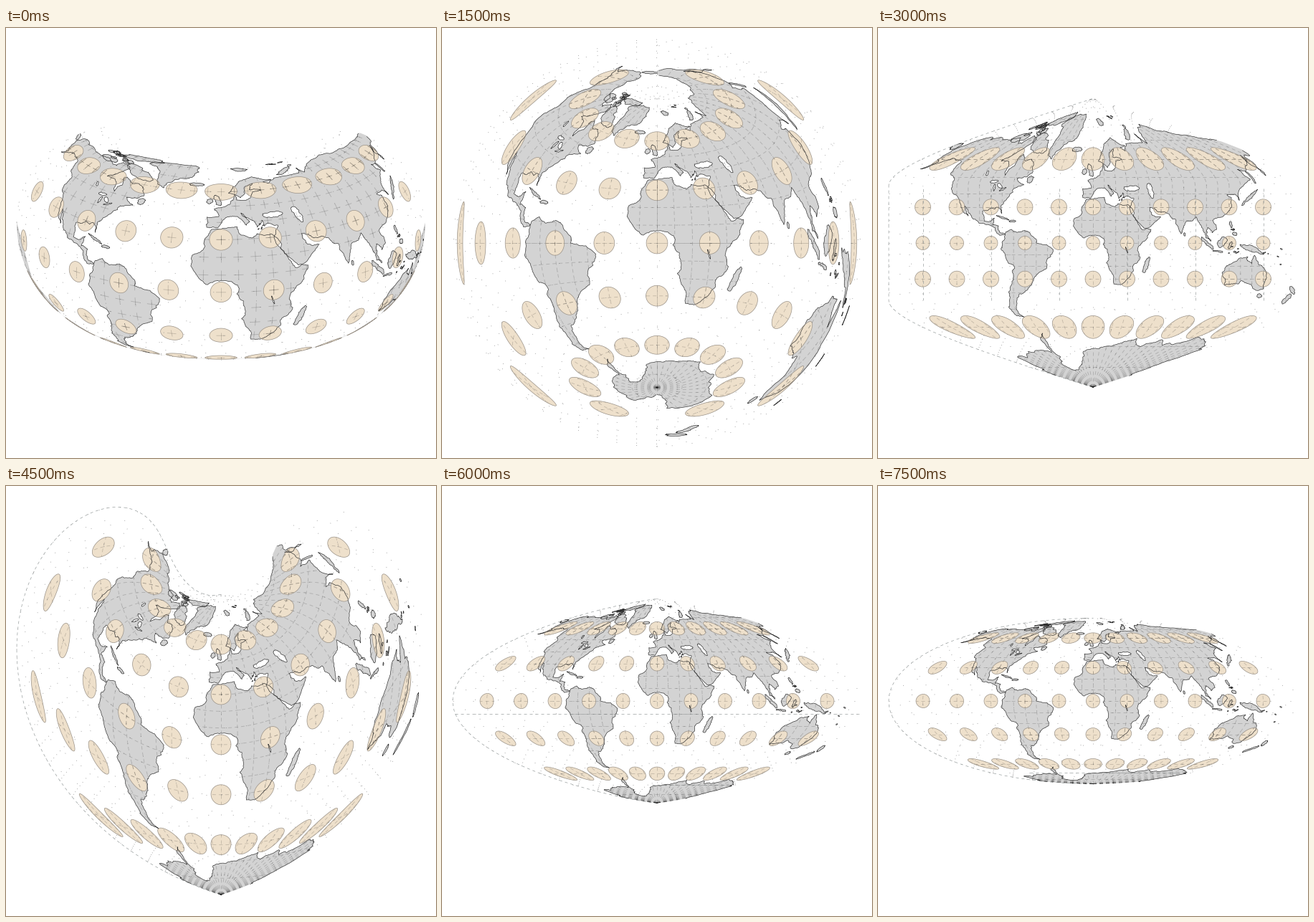
Recreate the animation shown at these times as a matplotlib script. Size 600x600 px, loop 8000 ms.

```python
import matplotlib.pyplot as plt
import numpy as np
from matplotlib.animation import FuncAnimation
from matplotlib.collections import LineCollection, PathCollection
from matplotlib.path import Path

plt.rcParams["lines.scale_dashes"] = False
SIZE, REACH, PX = 600, 285, 0.72
LAND, COAST, DISC = "#d3d3d3", "#2e2e2e", "#eee0cb"
rng = np.random.default_rng(7)

# Main capes and bays as lon, lat pairs; finer coast comes from roughen()
AFRICA = [
    -6, 35.8, 10, 37.3, 11, 33.5, 19, 30.5, 22, 32.8, 32.4, 31, 37.2, 21, 43.2, 11.5,
    51.1, 11.9, 48, 4.3, 39.5, -4.5, 40.6, -15, 34.8, -20, 35.5, -24, 32.5, -28.4,
    26, -33.9, 18.4, -34, 14.5, -23, 11.8, -17, 13.7, -11, 8.9, -1, 9.4, 4, 4.4, 6.3,
    -7.6, 4.4, -13.3, 9, -17.3, 14.7, -16.5, 21, -9.7, 30]
EURASIA = [
    32.5, 30.5, 36, 36.5, 27.5, 36.8, 26.2, 40.4, 22.8, 36.5, 19.4, 41, 13.2, 45.5,
    18.3, 40, 16, 38, 10.5, 43.5, 3.2, 43, -2, 36.8, -8.9, 37, -9.2, 43.1, -1.5, 43.5,
    -4.6, 48.2, 8.5, 53.8, 10, 57.5, 11, 54, 21, 55, 23.5, 59.2, 30, 59.9, 21.4, 61,
    25, 65.3, 17.5, 62, 14.2, 55.5, 5.5, 59, 14, 67.5, 26, 71, 41, 67, 34, 66, 38, 64.3,
    44, 68, 68, 68.5, 69, 72.8, 73, 68, 81, 73.5, 104, 77.6, 140, 72.6, 180, 69,
    180, 65, 163, 59.5, 157, 51, 156, 57, 163, 62, 137, 54.5, 140.5, 49, 128, 40,
    129, 35.2, 125, 39.5, 118, 39, 122, 37, 122, 30, 114, 22.3, 106, 20, 109, 12,
    105, 9, 101, 13.5, 104, 1.5, 98.5, 9, 94.5, 16, 91, 22.5, 80.2, 15, 77.6, 8,
    72.7, 20.5, 67, 24.8, 57, 26.5, 50, 30, 51.5, 24.5, 59.7, 22.4, 45, 12.8, 35, 28]
NORTH_AMERICA = [
    -168, 65.6, -166, 68.3, -156.5, 71.3, -128, 70, -96, 68, -94, 72, -82, 69, -87, 64.5,
    -94.5, 59, -82, 55, -80, 51.3, -77, 57, -77.7, 62.5, -69.5, 59, -64.5, 60, -56, 52.5,
    -60, 50.2, -68, 49.3, -65, 47, -61, 45.5, -70, 43, -76, 36, -81.3, 31, -80.5, 25.2,
    -83.5, 30, -90, 29.5, -97.3, 27, -96, 19, -91, 18.6, -87, 21.4, -88.5, 15.8, -83.3, 15,
    -82, 9, -77.5, 8, -85.7, 10.5, -94.5, 16, -105.5, 20.5, -113, 31, -110, 23.2, -117, 33,
    -124, 41, -123.5, 48.5, -134, 58.3, -148, 60.5, -154, 58.5, -164, 54.7, -158, 58.5,
    -165, 62]
SOUTH_AMERICA = [
    -77.5, 8, -72, 12, -62, 10.7, -51.5, 4.3, -50, 0, -35, -6, -39, -13, -41, -22,
    -48.5, -26, -54, -34.5, -57.5, -38, -65, -41, -67.4, -46, -69, -51, -65.5, -54.8,
    -72, -54, -75.5, -49, -73, -38, -70.3, -19, -76.5, -14, -81.2, -5, -80, 1, -77.5, 4]
AUSTRALIA = [
    142.5, -10.8, 146, -19, 153.2, -26, 150, -37.5, 144, -38.5, 138, -34, 131, -31.5,
    124, -33.5, 116, -34.8, 113.8, -25, 122, -18, 130, -13, 136.5, -12.2, 136, -15.5,
    140, -17.6]
GREENLAND = [
    -70, 77.5, -45, 82.5, -25, 82.5, -20, 76, -25, 70.5, -40, 65, -44, 60, -52, 64.5,
    -54, 70, -60, 76]
ANTARCTICA = [
    -180, -84.5, -155, -81, -148, -76, -100, -73, -70, -73, -67, -67, -58, -63.3,
    -62.5, -69, -62, -75, -78, -79, -60, -82, -28, -79, -17, -73, 0, -71, 33, -69,
    55, -66, 70, -70, 88, -66.6, 135, -66.2, 170, -71.5, 163, -78, 170, -83.7,
    180, -84.5, 180, -90, -180, -90]
# lon, lat, half length, half width, tilt
ISLANDS = [
    (-72, 68.5, 8, 2.6, -45), (-80, 80, 4.5, 2, 35), (-110, 71, 3.5, 2, 0),
    (-19, 65, 2.3, 1.3, 0), (-2.5, 54, 4.2, 1.2, 110), (-8, 53.3, 1.7, 1.2, 80),
    (17, 78.7, 2, 1.2, -60), (58, 73.5, 4.5, 0.9, 55), (-79.5, 21.7, 5, 0.6, -20),
    (-71, 18.9, 2.8, 0.8, 0), (-56, 48.8, 2.3, 1.7, 60), (46.8, -19.3, 6.8, 2, 70),
    (80.7, 7.5, 1.4, 0.8, 90), (101, -0.5, 7.5, 1.3, -45), (110, -7.3, 4.7, 0.6, -8),
    (114, 1, 5, 3.4, 50), (121, -2, 3.5, 1, 70), (140, -5.3, 10, 2.3, -22),
    (121.5, 16, 2.8, 1, -75), (125, 8, 2, 1.5, 0), (138, 37, 7, 1, 45),
    (142.8, 50, 4, 0.6, -85), (175.7, -38.5, 3, 1.3, -60), (170.5, -44, 4.2, 1.2, 45),
    (146.6, -42, 1.5, 1.4, 0), (-175, 66.5, 2.4, 1.2, -20)]
WATERS = [
    (34, 43.3, 5.3, 1.6, 0), (50.8, 41.8, 5.2, 1.7, -75), (-87.5, 47.6, 2.6, 0.8, 5),
    (-87, 43.8, 2, 0.6, 80), (-82, 44.8, 1.8, 1, -50), (-79.5, 42.8, 2.5, 0.4, 25),
    (-97.5, 52.3, 1.5, 0.5, -65), (29.6, -6, 2.6, 0.3, -70)]


def roughen(points, levels=4, amount=0.1):
    """Close a coast and break its edges by midpoint displacement."""
    p = np.reshape(points, (-1, 2)).astype(float)
    p = np.vstack([p, p[:1]])
    for _ in range(levels):
        a, b = p[:-1], p[1:]
        mid, d = (a + b) / 2, b - a
        c = np.maximum(np.cos(np.radians(mid[:, 1])), 0.1)
        seam = (np.abs(a[:, 0]) == 180) & (np.abs(b[:, 0]) == 180) | (mid[:, 1] < -89)
        g = np.where(seam, 0, rng.normal(0, amount, len(d)))
        mid += np.column_stack([-d[:, 1] / c, d[:, 0] * c]) * g[:, None]
        mid[:, 0] = np.clip(mid[:, 0], -180, 180)
        p = np.vstack([np.stack([a, mid], 1).reshape(-1, 2), p[-1:]])
    return p


def blob(lon, lat, length, width, tilt):
    """Rough ellipse in degrees, tilted from east."""
    a, t = np.arange(10) * np.pi / 5, np.radians(tilt)
    r = rng.uniform(0.85, 1.15, 10)
    u, v = length * r * np.cos(a), width * r * np.sin(a)
    x, y = u * np.cos(t) - v * np.sin(t), u * np.sin(t) + v * np.cos(t)
    return roughen(np.column_stack([lon + x / np.cos(np.radians(lat)), lat + y]), 3, 0.12)


def scatter(count, west, east, south, north, size):
    """Small islands strewn over a box."""
    return [blob(rng.uniform(west, east), rng.uniform(south, north), size * rng.uniform(0.4, 1),
                 size * rng.uniform(0.2, 0.5), rng.uniform(-60, 60)) for _ in range(count)]


lands = [roughen(c) for c in (AFRICA, EURASIA, NORTH_AMERICA, SOUTH_AMERICA, AUSTRALIA,
                              GREENLAND, ANTARCTICA)]
lands += [blob(*i) for i in ISLANDS]
lands += scatter(12, -122, -88, 72, 78, 2.2)
lands += scatter(6, 118, 130, -9, -3, 1.3) + scatter(4, 122, 125, 9, 12.5, 0.9)
lands += scatter(6, 150, 169, -20, -5, 1) + scatter(5, 22, 27, 35, 39, 0.5)
lands += scatter(4, 45, 62, 80, 81.5, 0.8)
lakes = [blob(*w) for w in WATERS]

# Projections
TILT = np.radians(20)
turn = np.linspace(-np.pi / 2, np.pi / 2, 6001)
turn_lat = np.arcsin(np.clip((2 * turn + np.sin(2 * turn)) / np.pi, -1, 1))


def lowest(lon):
    return -np.arctan(np.cos(lon / 2) / np.tan(TILT))


def armadillo(lon, lat):
    lat = np.maximum(lat, lowest(lon))
    r = 1 + np.cos(lat)
    y = (1 + np.sin(TILT) - np.cos(TILT)) / 2 + np.sin(lat) * np.cos(TILT)
    return r * np.sin(lon / 2), y - r * np.sin(TILT) * np.cos(lon / 2)


def azimuthal(lon, lat):
    k = np.sqrt(2 / np.maximum(1 + np.cos(lat) * np.cos(lon), 1e-9))
    return k * np.cos(lat) * np.sin(lon), k * np.sin(lat)


def dinomic(lon, lat):
    a = np.abs(lat)
    b = np.maximum(a, np.pi / 4)
    inner = np.arctanh(np.sin(np.minimum(a, np.pi / 4)))
    outer = np.sqrt(8) * (b - np.pi / 4) - np.log(np.tan(b / 2))
    low = a < np.pi / 4
    x = np.where(low, lon, lon * np.cos(b) * (np.sqrt(8) - 1 / np.sin(b)))
    return x, np.sign(lat) * np.where(low, inner, outer)


def bonne(lon, lat):
    r = 1 + np.pi / 4 - lat
    e = lon * np.cos(lat) / r
    return r * np.sin(e), 1 - r * np.cos(e)


def boggs(lon, lat):
    t = np.interp(lat, turn_lat, turn)
    c, ct = np.maximum(np.cos(lat), 1e-9), np.maximum(np.cos(t), 1e-9)
    return 2.00276 * lon / (1 / c + 1.11072 / ct), 0.49931 * (lat + np.sqrt(2) * np.sin(t))


def bromley(lon, lat):
    t = np.interp(lat, turn_lat, turn)
    return lon * np.cos(t), 4 / np.pi * np.sin(t)


def meridian(lon, low=-90, high=90):
    lat = np.linspace(low, high, 181)
    return np.column_stack([np.full_like(lat, lon), lat])


def parallel(lat, west=-180, east=180):
    lon = np.linspace(west, east, 361)
    return np.column_stack([lon, np.full_like(lon, lat)])


def circle(lon, lat, radius=6):
    """Small circle on the sphere."""
    a, r, p = np.linspace(0, 2 * np.pi, 73), np.radians(radius), np.radians(lat)
    q = np.arcsin(np.sin(p) * np.cos(r) + np.cos(p) * np.sin(r) * np.cos(a))
    d = np.arctan2(np.sin(a) * np.sin(r) * np.cos(p), np.cos(r) - np.sin(p) * np.sin(q))
    return np.column_stack([lon + np.degrees(d), np.degrees(q)])


discs = [circle(lon, lat) for lat in range(-60, 61, 30) for lon in range(-150, 151, 30)]
grid = [meridian(l) for l in range(-180, 180, 10)] + [parallel(l) for l in range(-80, 81, 10)]
ARM = 2.8
crosses = [s for lon in range(-170, 180, 10) for lat in range(-80, 81, 10)
           for s in (meridian(lon, lat - ARM, lat + ARM), parallel(lat, lon - ARM, lon + ARM))]
rim = meridian(-180)

# Each view: projection, lines that show over the sea
VIEWS = [
    (armadillo, []),
    (azimuthal, []),
    (dinomic, [rim] + [meridian(l, -45, 45) for l in range(-150, 151, 60)]),
    (bonne, [rim]),
    (boggs, [rim, parallel(-10), parallel(-70, -10, 150)]),
    (bromley, [rim, parallel(-70, -110, 150)]),
]


def fit(proj):
    lon, lat = np.meshgrid(np.linspace(-np.pi, np.pi, 721), np.linspace(-np.pi / 2, np.pi / 2, 361))
    x, y = proj(lon, lat)
    return REACH / np.abs(x).max(), (y.max() + y.min()) / 2


fits = [fit(proj) for proj, _ in VIEWS]

fig = plt.figure(figsize=(6, 6), dpi=100, facecolor="white")
ax = fig.add_axes([0, 0, 1, 1])


def draw(frame):
    n = frame // 3
    proj, sea_lines = VIEWS[n]
    scale, mid = fits[n]
    ax.clear()
    ax.set(xlim=(0, SIZE), ylim=(SIZE, 0))
    ax.axis("off")

    def place(p):
        x, y = proj(*np.radians(p).T)
        return np.column_stack([300 + scale * x, 300 - scale * (y - mid)])

    def stroke(p):
        q = place(p)
        if proj is armadillo:
            q[np.radians(p[:, 1]) < lowest(np.radians(p[:, 0]))] = np.nan
        return q

    def coast(p):
        q = stroke(p)
        q[(np.abs(p[:, 0]) > 179.9) | (p[:, 1] < -89)] = np.nan
        return q

    def lines(paths, color, width, dash="solid", **kw):
        c = LineCollection(paths, colors=color, linewidths=width * PX, linestyles=dash, **kw)
        ax.add_collection(c, autolim=False)
        return c

    def fill(paths, color):
        ax.add_collection(PathCollection([Path(p) for p in paths], facecolors=color,
                                         edgecolors="none"), autolim=False)

    def net(shapes):
        c = lines(net_paths, "black", 0.9, net_dash, alpha=0.17)
        c.set_clip_path(Path.make_compound_path(*[Path(s) for s in shapes]), ax.transData)

    full = [stroke(p) for p in grid]
    net_paths, net_dash = full, (0, (5 * PX, 4 * PX))
    if proj is armadillo:
        net_paths, net_dash = [stroke(p) for p in crosses], "solid"

    ground = [place(p) for p in lands]
    lines(full, "#8a8a8a", 0.7, (0, (1 * PX, 27 * PX)))
    lines([stroke(p) for p in sea_lines], "#999f9f", 0.7, (0, (4 * PX, 4 * PX)))
    fill(ground, LAND)
    net(ground)
    fill([place(p) for p in lakes], "white")
    lines([coast(p) for p in lands + lakes], COAST, 0.65)
    spots = [place(p) for p in discs]
    fill(spots, DISC)
    net(spots)
    lines(spots, "#9a9288", 0.7)
    return []


anim = FuncAnimation(fig, draw, frames=16, interval=500, repeat=True, repeat_delay=0)
plt.show()
```
